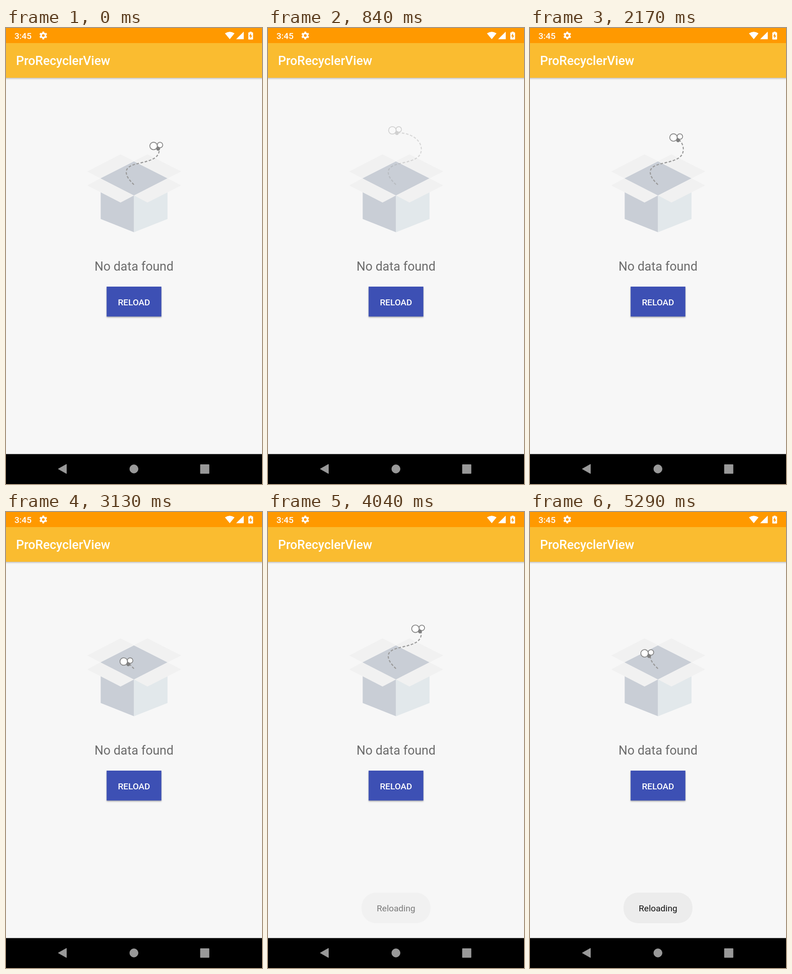
Write an HTML page that moves like this. It is 561x998 px and loops after 5390 ms.

```html
<!DOCTYPE html>
<html lang="en">
<head>
<meta charset="utf-8">
<title>ProRecyclerView</title>
<style>
  :root {
    --loop: 5390ms;
    --route: path("M280.5 343C270 333 264 325 263.5 316C263 303 278 299 296 295C322 289 336 283 336 265C336 246 315 230 285 229");
  }
  html, body { margin: 0; width: 100%; height: 100%; overflow: hidden; background: #f7f7f7; }
  svg { display: block; width: 100vw; height: 100vh; }
  text { font-family: Roboto, "Noto Sans", sans-serif; }
  .medium { font-weight: 500; }
  .middle { text-anchor: middle; }
  .bar { filter: drop-shadow(0 1.5px 2px rgba(0, 0, 0, .32)); }
  .button { filter: drop-shadow(0 2px 1.5px rgba(0, 0, 0, .3)); }

  .route { d: var(--route); fill: none; }
  .trail { stroke: #9a9a9a; stroke-width: 2.4; stroke-dasharray: 5.6 3.6; }
  .reveal { stroke: #fff; stroke-width: 8; stroke-dasharray: 1 2; }
  .fly { offset-path: var(--route); offset-rotate: 0deg; }
  .reveal, .fly { animation: travel var(--loop) linear infinite; }
  .flight { animation: vanish var(--loop) linear infinite; }
  .toast { animation: appear var(--loop) linear infinite; }

  /* Each flight takes 1510 ms and restarts every 2010 ms. */
  @keyframes travel {
    0% { offset-distance: 66.2%; stroke-dashoffset: .338; }
    9.647%, 18.737% { offset-distance: 100%; stroke-dashoffset: 0; }
    18.738% { offset-distance: 0%; stroke-dashoffset: 1; }
    46.753%, 56.029% { offset-distance: 100%; stroke-dashoffset: 0; }
    56.03% { offset-distance: 0%; stroke-dashoffset: 1; }
    84.045%, 93.32% { offset-distance: 100%; stroke-dashoffset: 0; }
    93.321% { offset-distance: 0%; stroke-dashoffset: 1; }
    100% { offset-distance: 23.84%; stroke-dashoffset: .7616; }
  }
  @keyframes vanish {
    0%, 13.358% { opacity: 1; }
    16.698%, 18.737% { opacity: 0; }
    18.738%, 50.649% { opacity: 1; }
    53.989%, 56.029% { opacity: 0; }
    56.03%, 87.941% { opacity: 1; }
    91.28%, 93.32% { opacity: 0; }
    93.321%, 100% { opacity: 1; }
  }
  @keyframes appear {
    0% { opacity: 0; }
    71.985% { opacity: 0; animation-timing-function: cubic-bezier(.5, 1, .89, 1); }
    81.262%, 100% { opacity: 1; }
  }
</style>
</head>
<body>
<svg viewBox="0 0 561 998" preserveAspectRatio="none">
  <defs>
    <mask id="drawn" maskUnits="userSpaceOnUse" x="0" y="0" width="561" height="998">
      <path class="route reveal" pathLength="1"/>
    </mask>
  </defs>

  <rect width="561" height="998" fill="#f7f7f7"/>

  <!-- Title and status bars -->
  <rect class="bar" x="-10" y="20" width="581" height="89" fill="#fabc30"/>
  <rect width="561" height="33" fill="#ff9900"/>
  <text class="medium" x="22" y="81" font-size="27.3" fill="#fff">ProRecyclerView</text>
  <text class="medium" x="18.5" y="23.5" font-size="19" fill="#fff">3:45</text>
  <g transform="translate(81.7 16.4)" fill="none" stroke="#fff">
    <circle r="4.8" stroke-width="3.6"/>
    <circle r="7.1" stroke-width="3" pathLength="12" stroke-dasharray="1 1" stroke-dashoffset="-.5"/>
  </g>
  <g fill="#fff">
    <path d="M490.3 24.5L479.8 11.7Q490.3 4.6 500.8 11.7Z"/>
    <path d="M521 8V24.5H504.3Z"/>
    <path d="M534 9.6V8H538.3V9.6H540.2Q541.4 9.6 541.4 10.8V24Q541.4 25.2 540.2 25.2H532.2Q531 25.2 531 24V10.8Q531 9.6 532.2 9.6Z"/>
  </g>
  <path d="M537 11.6L532.8 18.2H535.5V23L539.6 16.4H537Z" fill="#ff9900"/>

  <!-- Open box -->
  <path d="M207.5 329L280.5 292L280.5 447L207.5 418Z" fill="#c9ced6"/>
  <path d="M280.5 366L354 329V418L280.5 447Z" fill="#e2e8eb"/>
  <path d="M280.5 292L354 329L280.5 366.5L207 329Z" fill="#c9ced6"/>
  <g fill="#f1f1f1">
    <path d="M178 314L251 276.5L280.5 291.5L207 329Z"/>
    <path d="M384 314L310 276.5L280.5 291.5L354 329Z"/>
    <path d="M207 329L280.5 366.5L251 382L178 344.5Z"/>
    <path d="M354 329L280.5 366.5L310 382L384 344.5Z"/>
  </g>

  <g class="flight">
    <g mask="url(#drawn)"><path class="route trail"/></g>
    <g class="fly">
      <g fill="#fff" stroke="#868686" stroke-width="1.8">
        <circle cx="-12.5" cy="-5" r="8.2"/>
        <circle cx="1.5" cy="-7" r="6"/>
      </g>
      <circle cx="-2.5" cy="1" r="4.2" fill="#808080"/>
    </g>
  </g>

  <text class="middle" x="280.5" y="531" font-size="27.3" fill="#6c6c6c">No data found</text>
  <rect class="button" x="220.5" y="566" width="120" height="65.5" fill="#3d50b4"/>
  <text class="medium middle" x="280.5" y="606.5" font-size="19.1" fill="#fff">RELOAD</text>

  <g class="toast">
    <rect x="205" y="833" width="151" height="67" rx="32" fill="#ececec"/>
    <text class="middle" x="280.5" y="874" font-size="19.1" fill="#111">Reloading</text>
  </g>

  <!-- Navigation bar -->
  <rect y="932.5" width="561" height="65.5" fill="#000"/>
  <g fill="#999" stroke="#999" stroke-linejoin="round">
    <path d="M114.5 965L132.5 954.8V975.2Z"/>
    <circle cx="280.3" cy="965" r="9.2"/>
    <rect x="426" y="955.5" width="19" height="19.5"/>
  </g>
</svg>
</body>
</html>
```
